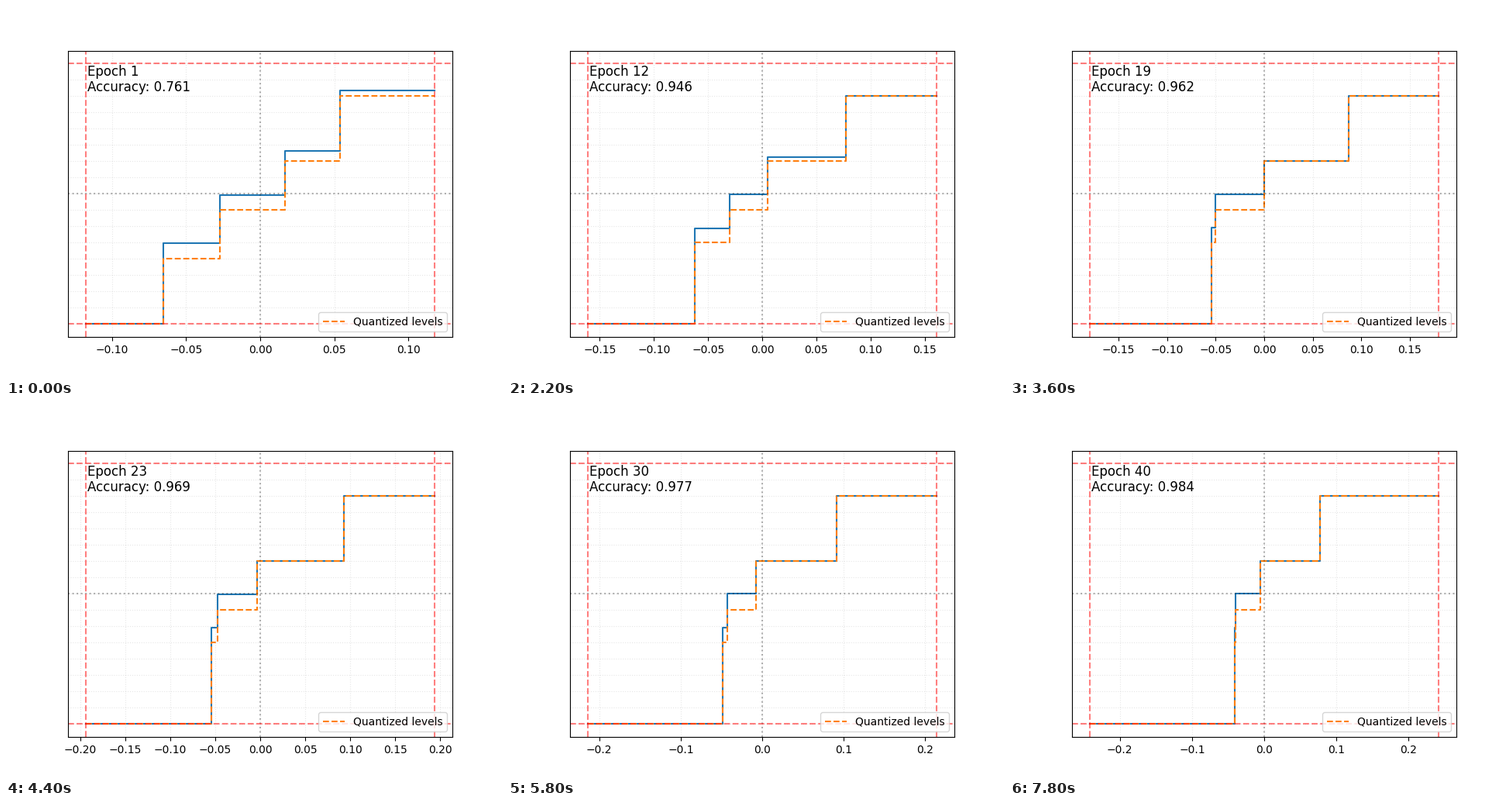
These frames come from a looping animation (640 px wide and 480 px high, 8 s). A matplotlib script:

```python
import numpy as np
import matplotlib.pyplot as plt
from matplotlib.animation import FuncAnimation

EPOCHS = 40
INTERVAL = 200
STEP = 1 / 8  # spacing of the quantization grid

# (epoch, value) key points
RANGE = [(1, .1178), (6, .150), (12, .1614), (19, .1799), (23, .1942),
         (30, .2144), (40, .2421)]
ACCURACY = [(1, .761), (6, .919), (12, .946), (19, .962), (23, .969),
            (30, .977), (40, .984)]
EDGES = [
    [(1, -.0653), (12, -.0623), (19, -.0543), (23, -.0542), (40, -.0403)],
    [(1, -.0272), (6, -.0319), (12, -.0301), (19, -.0503), (30, -.0428),
     (40, -.0397)],
    [(1, .0167), (12, .0050), (23, -.0034), (30, -.0076), (40, -.0054)],
    [(1, .0538), (12, .0773), (23, .0929), (30, .0913), (40, .0773)],
]


def track(epoch, keys):
    return np.interp(epoch, *zip(*keys))


def weight_range(epoch):
    epochs, values = np.transpose(RANGE)
    return np.interp(np.log(epoch), np.log(epochs), values)


def accuracy(epoch):
    """The error falls as a power law between key points."""
    epochs, values = np.transpose(ACCURACY)
    return 1 - np.exp(np.interp(np.log(epoch), np.log(epochs),
                                np.log(1 - values)))


def heights(epoch):
    """Each step settles from its starting height to a grid level."""
    age = epoch - 1
    return np.array([
        -1,
        -0.26 - 0.118 * np.exp(-age / 3),
        -0.01 * epoch ** -0.85,
        max(0.251, 0.334 - 0.0043 * epoch),
        0.751 + 0.043 * np.exp(-age),
    ])


def staircase(edges, levels, limit):
    x = np.concatenate([[-limit], np.repeat(edges, 2), [limit]])
    return x, np.repeat(levels, 2)


fig, ax = plt.subplots(figsize=(6.4, 4.8), dpi=100)
ax.set_ylim(-1.1, 1.1)
ax.set_yticks(np.arange(-1, 1 + STEP / 2, STEP))
ax.tick_params(left=False, labelleft=False)
ax.grid(linestyle=":", alpha=0.3)

curve, = ax.plot([], [], color="C0")
quantized, = ax.plot([], [], color="C1", linestyle="--",
                     label="Quantized levels")

zero = dict(color="black", linestyle=":", alpha=0.3)
ax.axhline(0, **zero)
ax.axvline(0, **zero)

bound = dict(color="red", linestyle="--", alpha=0.5)
for y in (-1, 1):
    ax.axhline(y, **bound)
left = ax.axvline(-1, **bound)
right = ax.axvline(1, **bound)

label = ax.text(0.05, 0.95, "", transform=ax.transAxes, va="top",
                fontsize=12, linespacing=1.12)
ax.legend(loc="lower right")


def update(frame):
    epoch = frame + 1
    limit = weight_range(epoch)
    edges = [track(epoch, keys) for keys in EDGES]
    levels = heights(epoch)
    snapped = np.floor(levels / STEP) * STEP

    curve.set_data(*staircase(edges, levels, limit))
    quantized.set_data(*staircase(edges, snapped, limit))
    left.set_xdata([-limit, -limit])
    right.set_xdata([limit, limit])
    ax.set_xlim(-1.1 * limit, 1.1 * limit)
    label.set_text(f"Epoch {epoch}\nAccuracy: {accuracy(epoch):.3f}")
    return curve, quantized, left, right, label


anim = FuncAnimation(fig, update, frames=EPOCHS, interval=INTERVAL,
                     repeat=True, repeat_delay=0, blit=False)
plt.show()
```
